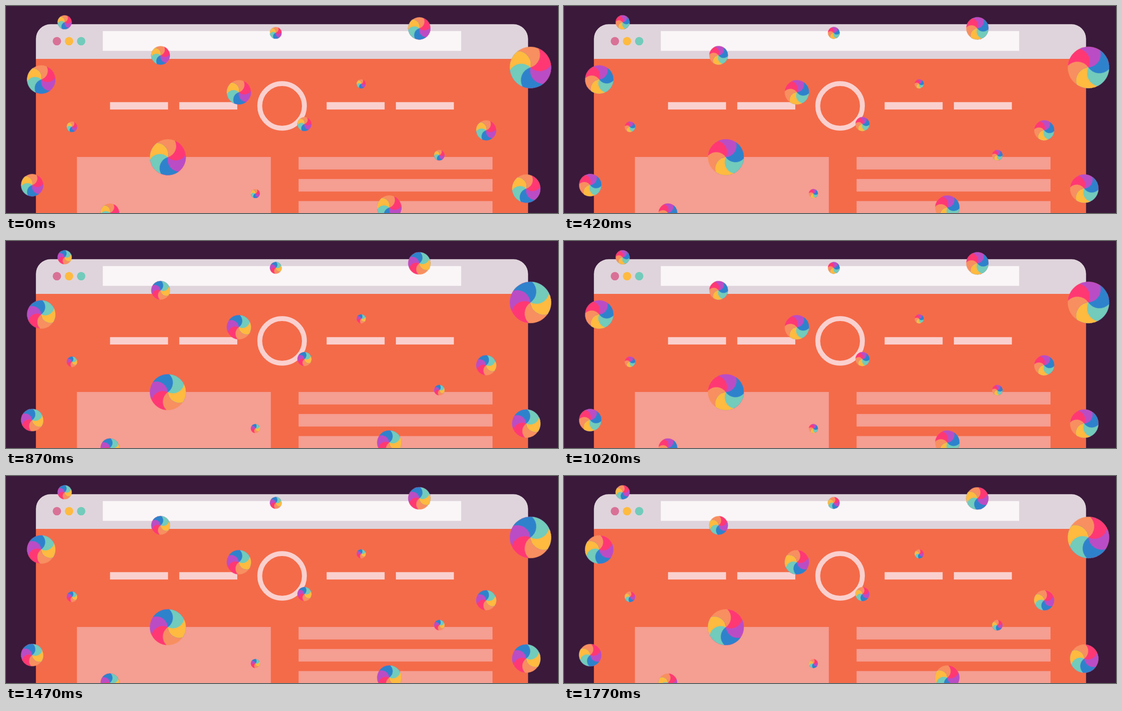
An HTML page for the animation above (1.8 s loop, 1222 by 458 pixels).

```html
<!DOCTYPE html>
<html lang="en">
<head>
<meta charset="utf-8">
<title>Spinning wheels</title>
<style>
  html, body { margin: 0; width: 100%; height: 100%; overflow: hidden; background: #3a193b; }
  svg { display: block; width: 1222px; height: 458px; }
  .spin { transform-origin: 0 0; animation: spin 600ms steps(20) infinite; }
  @keyframes spin { from { transform: rotate(0deg); } to { transform: rotate(360deg); } }
</style>
</head>
<body>
<svg viewBox="0 0 1222 458">
  <defs>
    <g id="wheel"></g>
    <clipPath id="frame"><rect x="66.2" y="40.3" width="1089.5" height="500" rx="32.5"/></clipPath>
  </defs>
  <g clip-path="url(#frame)">
    <rect width="1222" height="118" fill="#dfd4db"/>
    <rect y="117" width="1222" height="341" fill="#f46b49"/>
    <rect x="214.3" y="55.5" width="793.3" height="43.7" fill="#faf6f7"/>
    <g id="page"></g>
    <circle cx="611.2" cy="221" r="49.4" fill="none" stroke="#fad0ce" stroke-width="10.8"/>
  </g>
  <g id="wheels"></g>
</svg>
<script>
  const fill = (id, parts) => { document.getElementById(id).innerHTML = parts.join(''); };
  const rect = (x, y, w, h, color) =>
    `<rect x="${x}" y="${y}" width="${w}" height="${h}" fill="${color}"/>`;

  // Page: three window buttons, mirrored menu bars, a panel and repeating text lines.
  const center = 610.9, barWidth = 128.4, columnWidth = 429.3, columnTop = 334;
  const buttons = ['#d97197', '#ffba40', '#72cbbb'].map((color, i) =>
    `<circle cx="${112.7 + 26.85 * i}" cy="77.8" r="9.3" fill="${color}"/>`);
  const menu = [98.9, 252.2].flatMap(gap => [center + gap, center - gap - barWidth])
    .map(x => rect(x, 212.7, barWidth, 16.3, '#fad0ce'));
  const lines = [0, 1, 2].map(i =>
    rect(647.7, columnTop + 48.8 * i, columnWidth, 27.7, '#f59e92'));
  fill('page', [...buttons, ...menu, rect(157, columnTop, columnWidth, 124, '#f59e92'), ...lines]);

  // Wheel of radius 1: six sectors between equally spaced, curved edges.
  const colors = ['#f88f60', '#ff3874', '#ba4dc5', '#2e82cc', '#72cbbb', '#ffba40'];
  const firstEdge = -37.5; // degrees clockwise from the top
  const bend = 0.64;       // radius of the edge arcs

  const rim = deg => {
    const a = deg * Math.PI / 180;
    return `${Math.sin(a).toFixed(4)} ${(-Math.cos(a)).toFixed(4)}`;
  };
  // Each sector reaches round to the first edge; later ones cover its excess.
  const sector = (color, i) => {
    if (!i) return `<circle r="1" fill="${color}"/>`;
    return `<path fill="${color}" d="M0 0A${bend} ${bend} 0 0 0 ${rim(firstEdge + i * 60)}
      A1 1 0 ${i < 3 ? 1 : 0} 1 ${rim(firstEdge)}A${bend} ${bend} 0 0 1 0 0z"/>`;
  };
  fill('wheel', colors.map(sector));

  // Scattered wheels, grouped by radius.
  const scatter = (r, ...points) => points.map(([x, y]) =>
    `<g transform="translate(${x} ${y}) scale(${r})"><use href="#wheel" class="spin"/></g>`).join('');
  fill('wheels', [
    scatter(10, [786.3, 172.3], [552, 415]),
    scatter(11.6, [146, 267.3], [959.3, 330]),
    scatter(13, [597.2, 59.5]),
    scatter(15.5, [129.8, 36], [660.7, 261.2]),
    scatter(20.6, [342.2, 109.2], [230, 457.5]),
    scatter(22.2, [1063, 275]),
    scatter(24.7, [915, 49.5], [58, 396.3]),
    scatter(26.9, [515.5, 190.8], [848.5, 446]),
    scatter(31.4, [78, 162.6], [1151.7, 404]),
    scatter(39.8, [358.3, 334.5]),
    scatter(45.8, [1161, 136])
  ]);
</script>
</body>
</html>
```
